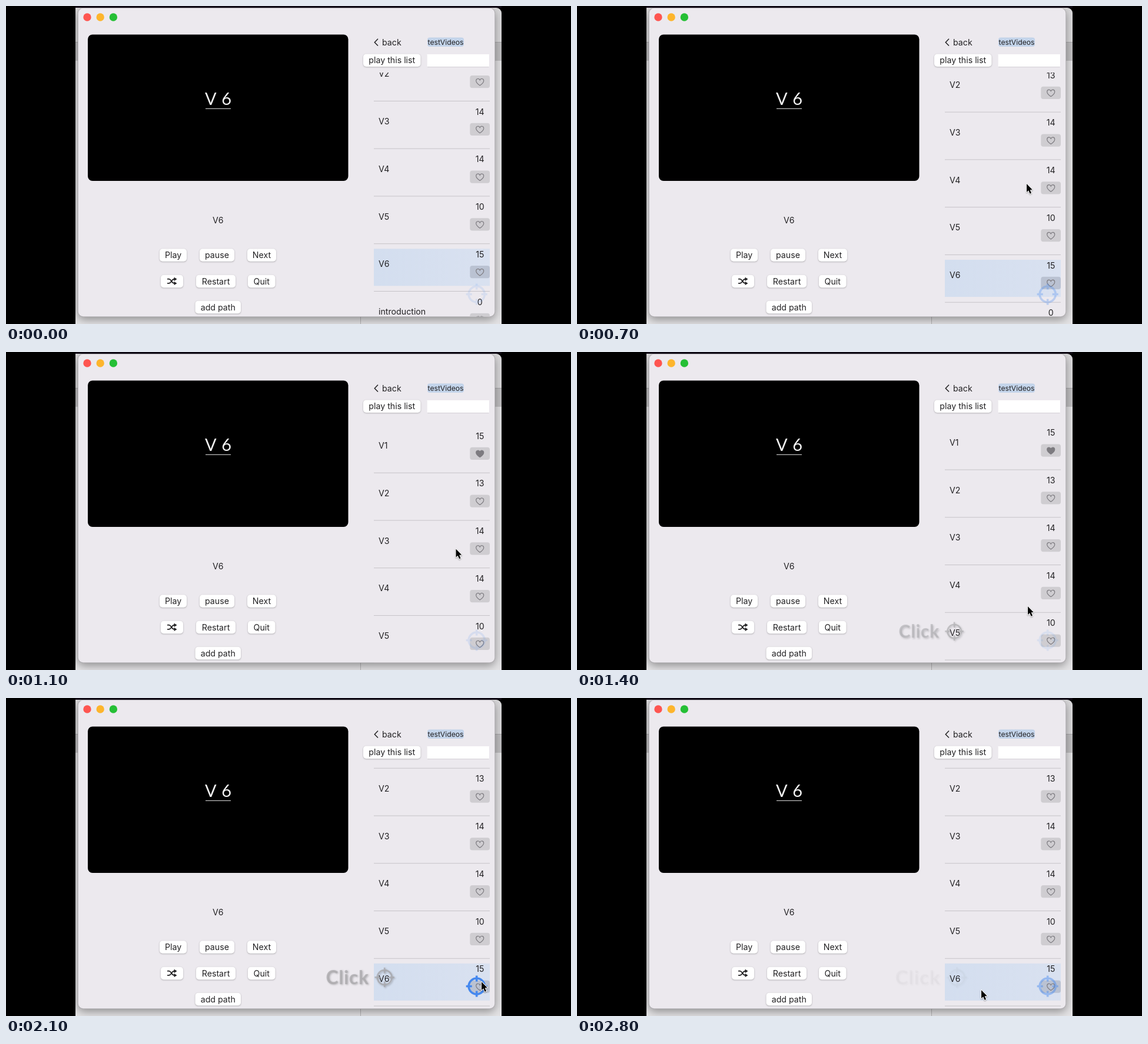
Animation of 960 by 540 pixels, one loop 2900 ms. Source, as an HTML page with a canvas:

```html
<!DOCTYPE html>
<html lang="en">
<head>
<meta charset="utf-8">
<title>Playlist player</title>
<style>
html, body { margin: 0; width: 100%; height: 100%; overflow: hidden; background: #000; }
canvas { display: block; width: 960px; height: 540px; }
</style>
</head>
<body>
<canvas id="stage" width="960" height="540"></canvas>
<script>
const ctx = document.getElementById('stage').getContext('2d');
const LOOP = 2900, STEP = 100;
const UI = 'Inter, "Liberation Sans", sans-serif';
const INK = '#222123', WINDOW = '#ece9ee';
const ROW = 80.75;
const SELECTED = 5;
const rows = [['V1', 15], ['V2', 13], ['V3', 14], ['V4', 14], ['V5', 10], ['V6', 15], ['introduction', 0]];

// Keyframes are [time, value, ...]; values between them are linear.
const scrollKeys = [[600, 34.5], [700, 53.2], [800, 112], [900, 163.8], [1000, 162], [1100, 159], [1200, 156.5], [1300, 154.8], [1400, 153.8]];
const cursorKeys = [[100, 706, 470], [300, 742, 360], [500, 764, 302], [1000, 764, 302], [1400, 766, 432], [1600, 786, 458],
  [1800, 804, 478], [2100, 808, 482], [2300, 806, 483], [2600, 720, 495], [2800, 687, 496]];
const targetKeys = [[0, .13], [500, .3], [700, .3], [900, .15], [1400, .11], [1600, .35], [1800, .7], [2100, 1], [2300, .95], [2800, .45]];
const clickKeys = [[1200, 0], [1400, .75], [1600, .95], [1800, 1], [2200, 1], [2800, .1]];

function at(keys, t, i = 1) {
  if (t <= keys[0][0]) return keys[0][i];
  for (let k = 1; k < keys.length; k++) {
    const a = keys[k - 1], b = keys[k];
    if (t <= b[0]) return a[i] + (b[i] - a[i]) * (t - a[0]) / (b[0] - a[0]);
  }
  return keys[keys.length - 1][i];
}

function rect(x, y, w, h, color) {
  ctx.fillStyle = color;
  ctx.fillRect(x, y, w, h);
}

function roundRect(x, y, w, h, r, color) {
  ctx.beginPath();
  ctx.roundRect(x, y, w, h, r);
  ctx.fillStyle = color;
  ctx.fill();
}

// y is the middle of the capitals
function text(s, x, y, { size = 14.2, align = 'center', color = INK, font = UI, weight = 400 } = {}) {
  ctx.font = `${weight} ${size}px ${font}`;
  ctx.textAlign = align;
  ctx.fillStyle = color;
  ctx.fillText(s, x, y + size * .36);
}

function withShadow(color, blur, dx, dy, draw) {
  ctx.save();
  ctx.shadowColor = color;
  ctx.shadowBlur = blur;
  ctx.shadowOffsetX = dx;
  ctx.shadowOffsetY = dy;
  draw();
  ctx.restore();
}

function button(label, x, y, w) {
  withShadow('rgba(0,0,0,.28)', 2.5, 0, .8, () => roundRect(x, y, w, 21.5, 5, '#fff'));
  if (label) text(label, x + w / 2, y + 10.8);
}

function heart(x, y, filled) {
  ctx.beginPath();
  ctx.moveTo(x, y + 6);
  ctx.bezierCurveTo(x - 3, y + 4, x - 6.5, y + 1.5, x - 6.5, y - 2);
  ctx.bezierCurveTo(x - 6.5, y - 6.3, x - 1.5, y - 6.8, x, y - 3.2);
  ctx.bezierCurveTo(x + 1.5, y - 6.8, x + 6.5, y - 6.3, x + 6.5, y - 2);
  ctx.bezierCurveTo(x + 6.5, y + 1.5, x + 3, y + 4, x, y + 6);
  ctx.strokeStyle = ctx.fillStyle = '#7d7b80';
  ctx.lineWidth = 1.2;
  ctx.stroke();
  if (filled) ctx.fill();
}

function reticle(x, y, r, width, inner, outer, color) {
  ctx.strokeStyle = color;
  ctx.lineWidth = width;
  ctx.beginPath();
  ctx.arc(x, y, r, 0, Math.PI * 2);
  for (let q = 0; q < 4; q++) {
    const c = Math.cos(q * Math.PI / 2), s = Math.sin(q * Math.PI / 2);
    ctx.moveTo(x + c * inner, y + s * inner);
    ctx.lineTo(x + c * outer, y + s * outer);
  }
  ctx.stroke();
}

function drawBackdrop() {
  rect(0, 0, 960, 540, '#000');
  rect(118, 0, 724, 3, '#100b15');
  ctx.save();
  ctx.beginPath();
  ctx.roundRect(118, 3, 724, 545, [0, 9, 0, 0]);
  ctx.clip();
  rect(118, 3, 724, 59, '#dcdbdd');
  rect(118, 62, 724, 31, '#c2c1c3');
  rect(118, 61, 724, 1, '#aaa9ab');
  rect(118, 93, 724, 447, '#e4e3e5');
  rect(602, 528, 1, 12, '#b5b4b6');
  withShadow('rgba(0,0,0,.4)', 16, 0, 4, () => roundRect(122, 3, 709, 525, 9, '#aaa7ab'));
  ctx.restore();
  roundRect(122.7, 3.7, 707.6, 523.6, 8.5, WINDOW);
}

function drawPlayer() {
  ['#fe5550', '#fdb52c', '#25bf35'].forEach((color, i) => {
    ctx.beginPath();
    ctx.arc(138 + i * 22.2, 19, 6.7, 0, Math.PI * 2);
    ctx.fillStyle = color;
    ctx.fill();
  });
  roundRect(139, 48.5, 442.5, 248.5, 8, '#000');
  const title = { size: 29, color: '#f2f2f2', font: 'Lato, sans-serif' };
  text('V', 347.7, 157.7, title);
  text('6', 374.7, 157.7, title);
  rect(339, 173.7, 43, 1.3, '#b4b4b4');
  text('V6', 360.3, 364.3);

  button('Play', 261, 412.3, 46);
  button('pause', 329, 412.3, 59);
  button('Next', 410, 412.3, 49);
  button('', 263, 456.8, 38);
  button('Restart', 323, 456.8, 67);
  button('Quit', 411, 456.8, 46.5);
  button('add path', 321.5, 500.8, 77.5);
  drawShuffle(282, 467.3);
}

function drawShuffle(x, y) {
  ctx.strokeStyle = ctx.fillStyle = INK;
  ctx.lineWidth = 1.7;
  for (const d of [-1, 1]) {
    ctx.beginPath();
    ctx.moveTo(x - 8, y - d * 3.6);
    ctx.lineTo(x - 5, y - d * 3.6);
    ctx.bezierCurveTo(x - 1, y - d * 3.6, x - 1, y + d * 3.6, x + 4, y + d * 3.6);
    ctx.stroke();
    ctx.beginPath();
    ctx.moveTo(x + 3.5, y + d * 3.6 - 3.2);
    ctx.lineTo(x + 8.5, y + d * 3.6);
    ctx.lineTo(x + 3.5, y + d * 3.6 + 3.2);
    ctx.fill();
  }
}

function drawListHeader() {
  ctx.strokeStyle = INK;
  ctx.lineWidth = 1.5;
  ctx.beginPath();
  ctx.moveTo(632, 55.8);
  ctx.lineTo(626.3, 61.7);
  ctx.lineTo(632, 67.6);
  ctx.stroke();
  text('back', 639, 61.7, { align: 'left' });
  roundRect(716, 53.5, 62, 15.5, 4, '#c3d4ea');
  text('testVideos', 747, 61.5, { size: 12.2 });
  button('play this list', 607, 81.5, 97.5);
  withShadow('rgba(0,0,0,.3)', 1.5, 0, .6, () => rect(715.5, 82, 105.5, 21, '#fff'));
}

function drawList(first) {
  ctx.save();
  ctx.beginPath();
  ctx.rect(610, 113, 220, 414.5);
  ctx.clip();
  rows.forEach(([name, count], i) => {
    const y = first + i * ROW, chosen = i === SELECTED;
    if (chosen) {
      const glow = ctx.createLinearGradient(625, 0, 822, 0);
      glow.addColorStop(0, '#d3deef');
      glow.addColorStop(1, '#d9e1f0');
      rect(625, y - 26, 197, 63, glow);
    }
    text(name, 633, y, { align: 'left' });
    text(String(count), 805.3, y - 16.5);
    roundRect(788.3, y + 2.7, 33.7, 21.3, 4, chosen ? '#bac2d2' : '#cfcdd1');
    heart(805.2, y + 13.8, i === 0);
    if (i < rows.length - 1) rect(625, y + 45.7, 197, 1, '#c6c3c8');
  });
  ctx.restore();
}

function drawClickHint(t) {
  const alpha = at(clickKeys, t);
  if (!alpha) return;
  const scale = 1 + (t - 1400) / 1400 * .11;
  ctx.save();
  ctx.globalAlpha = alpha * .72;
  ctx.translate(602, 474.3);
  ctx.scale(scale, scale);
  withShadow('rgba(70,70,75,.45)', 3, 1.5, 1.5, () => {
    ctx.letterSpacing = '.8px';
    text('Click', -55.5, 0, { size: 30, align: 'left', color: '#a9a8ab', font: 'Lato, sans-serif', weight: 700 });
    ctx.letterSpacing = '0px';
    reticle(39, 0, 11.7, 2.4, 6.5, 15.8, '#a5a4a7');
  });
  ctx.restore();
}

function drawTarget(t) {
  ctx.save();
  ctx.globalAlpha = at(targetKeys, t);
  reticle(799.7, 489.5, 13.5, 3.6, 8, 18, '#4588ee');
  ctx.restore();
}

function drawCursor(t) {
  if (t < cursorKeys[0][0]) return;
  ctx.save();
  ctx.translate(at(cursorKeys, t, 1), at(cursorKeys, t, 2));
  ctx.beginPath();
  [[0, 0], [0, 14], [3.2, 11.2], [5.6, 16.8], [8, 15.8], [5.7, 10.3], [9.8, 10]].forEach(p => ctx.lineTo(...p));
  ctx.closePath();
  ctx.strokeStyle = '#fff';
  ctx.lineWidth = 2;
  ctx.lineJoin = 'round';
  withShadow('rgba(0,0,0,.35)', 2, 0, 1, () => ctx.stroke());
  ctx.fillStyle = '#000';
  ctx.fill();
  ctx.restore();
}

function render(now) {
  const t = Math.floor((now % LOOP) / STEP) * STEP;
  drawBackdrop();
  drawPlayer();
  drawListHeader();
  // The list jumps down by one row on the click
  drawList(at(scrollKeys, t) - (t >= 2000 ? ROW : 0));
  drawTarget(t);
  drawClickHint(t);
  drawCursor(t);
}

const start = performance.now();
function frame() {
  render(performance.now() - start);
  requestAnimationFrame(frame);
}
frame();
</script>
</body>
</html>
```
